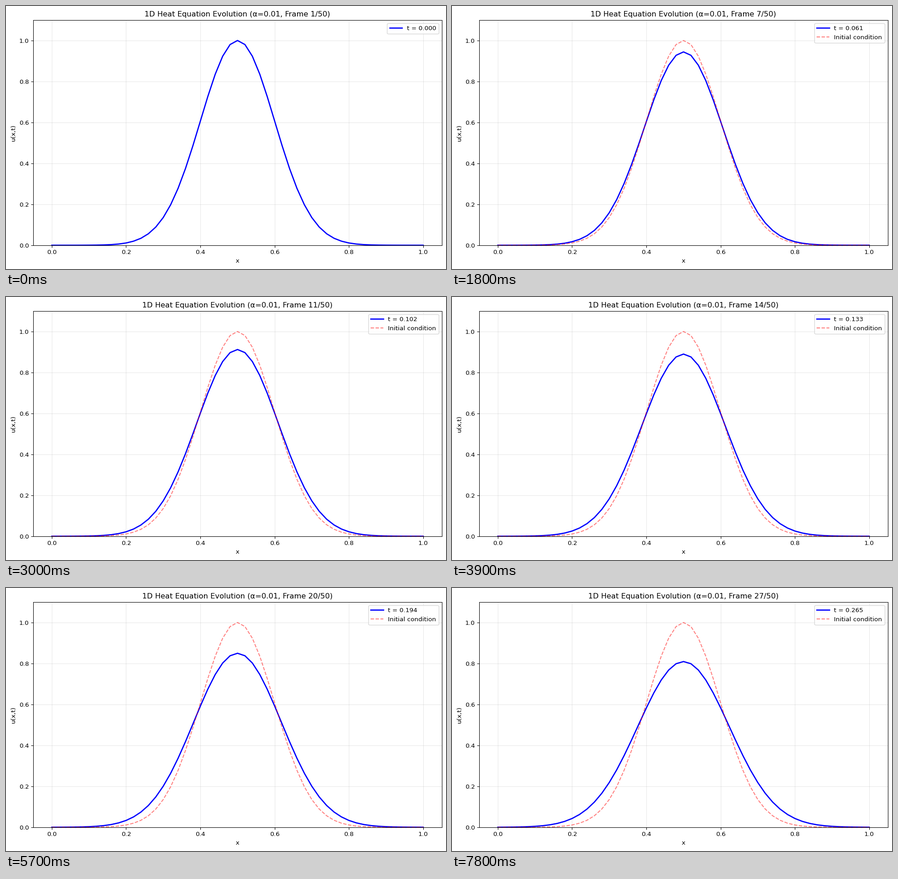
A matplotlib script for the animation above (8000 ms loop, 969 by 578 pixels).

```python
import numpy as np
import matplotlib.pyplot as plt
from matplotlib.animation import FuncAnimation

WIDTH, HEIGHT, DPI = 969, 578, 97.9
LEFT, RIGHT, TOP, BOTTOM = 60, 959.7, 30.8, 525.8
ALPHA, T_END, STEPS = 0.01, 0.5, 50
TICKS_PER_STEP, TICK_MS, TICKS = 3, 100, 80

plt.rcParams["font.family"] = "DejaVu Sans"

x = np.linspace(0, 1, 51)
dx = x[1] - x[0]
initial = np.exp(-((x - 0.5) ** 2) / (2 * 0.1 ** 2))
times = np.linspace(0, T_END, STEPS)

# Finite-difference Laplacian with fixed ends, solved by its eigenmodes.
n = len(x) - 2
laplacian = (np.eye(n, k=1) + np.eye(n, k=-1) - 2 * np.eye(n)) / dx ** 2
rates, modes = np.linalg.eigh(laplacian)
weights = modes.T @ initial[1:-1]


def temperature(t):
    u = np.zeros_like(x)
    u[1:-1] = modes @ (np.exp(ALPHA * rates * t) * weights)
    return u


# The tiny margin keeps the canvas from being truncated one pixel short.
fig = plt.figure(figsize=((WIDTH + 1e-6) / DPI, (HEIGHT + 1e-6) / DPI),
                 dpi=DPI, facecolor="white")
ax = fig.add_axes([LEFT / WIDTH, 1 - BOTTOM / HEIGHT,
                   (RIGHT - LEFT) / WIDTH, (BOTTOM - TOP) / HEIGHT])


def draw(tick):
    step = tick // TICKS_PER_STEP
    t = times[step]
    ax.clear()
    ax.plot(x, temperature(t), "b-", linewidth=2, label=f"t = {t:.3f}")
    if step > 0:
        ax.plot(x, initial, "r--", alpha=0.5, label="Initial condition")
    ax.set_xlim(-0.05, 1.05)
    ax.set_ylim(0, 1.1)
    ax.set_xlabel("x")
    ax.set_ylabel("u(x,t)")
    ax.set_title(f"1D Heat Equation Evolution (α={ALPHA}, Frame {step + 1}/{STEPS})")
    ax.grid(True, alpha=0.3)
    ax.legend(loc="upper right")
    return ax.get_children()


anim = FuncAnimation(fig, draw, frames=TICKS, interval=TICK_MS,
                     repeat=True, repeat_delay=0, blit=False)
plt.show()
```
